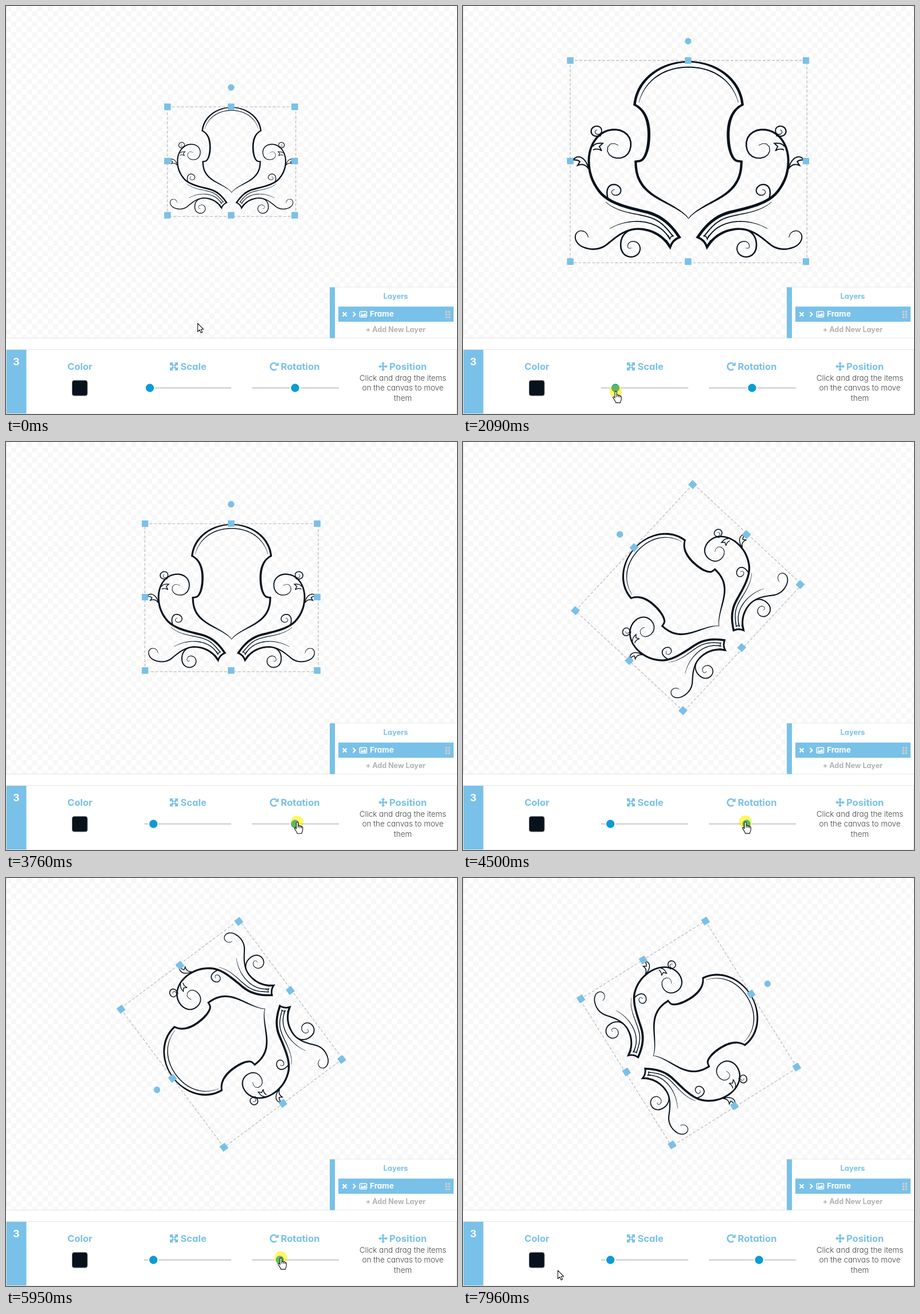
Write an HTML page that moves like this. It is 787 px wide and 712 px high and loops after 7990 ms.

```html
<!DOCTYPE html>
<html lang="en">
<head>
<meta charset="utf-8">
<title>Frame editor</title>
<style>
  html, body { margin: 0; width: 100%; height: 100%; overflow: hidden; background: #fff; }
  svg { display: block; width: 787px; height: 712px; }
  text { font-family: Inter, "Open Sans", sans-serif; font-feature-settings: "cv11"; font-weight: 700; }
  .blue { fill: #79c1e8; }
  .label { font-size: 16.5px; }
  .hint { font-size: 13.4px; font-weight: 300; fill: #444; }
  .mid { text-anchor: middle; }
  .ink { fill: #07121c; }
  .track { stroke: #c9c9c9; stroke-width: 2; }
  .thumb { fill: #0c9bd6; stroke: #fff; stroke-width: 2; }
  .pointer { fill: #fff; stroke: #111; stroke-width: 1.1; stroke-linejoin: round; }
</style>
</head>
<body>
<svg viewBox="0 0 787 712">
  <defs>
    <pattern id="checker" width="18.2" height="18.2" patternUnits="userSpaceOnUse">
      <path d="M0 0h9.1v9.1h-9.1zM9.1 9.1h9.1v9.1h-9.1z" fill="#f7f7f7"/>
    </pattern>
    <path id="diagonal" d="M-7-7H-.9L-2.8-5.1.2-2.1-2.1.2-5.1-2.8-7-.9Z"/>
    <path id="straight" d="M0-8 3.5-4.4H1.3V0H-1.3V-4.4H-3.5Z"/>
  </defs>

  <rect width="787" height="580" fill="url(#checker)"/>
  <path d="M.5 0V579.5H787" fill="none" stroke="#e4e4e4"/>

  <g id="art" class="ink">
    <g id="half"></g>
    <use href="#half" transform="matrix(-1 0 0 1 787.4 0)"/>
  </g>
  <g id="selection">
    <rect id="outline" fill="none" stroke="#c8c8cb" stroke-width="1.6" stroke-dasharray="5 3"/>
    <g id="handles" class="blue" stroke="#6fb4da" stroke-width=".6"></g>
  </g>

  <!-- layers -->
  <rect x="565" y="491" width="222" height="89" fill="#fff"/>
  <path d="M565 490.5H787M565 579.5H787" stroke="#e9e9e9"/>
  <g class="blue">
    <rect x="565" y="491" width="9" height="88.5"/>
    <rect x="580" y="524.5" width="201" height="26.5"/>
    <text class="mid" x="680" y="511.3" font-size="12.8">Layers</text>
  </g>
  <path d="M587.5 534.5l7 7m0-7l-7 7M605.5 534l4 4-4 4" fill="none" stroke="#fff" stroke-width="2.2"/>
  <rect x="617.2" y="533.2" width="12.2" height="9.6" rx="1.2" fill="none" stroke="#fff" stroke-width="1.5"/>
  <path d="M619 541.3v-1.8l2-2 1.6 1.5 3.2-3.2 2 2v3.5z" fill="#fff"/>
  <circle cx="620.4" cy="536" r="1.1" fill="#fff"/>
  <text x="635" y="542.4" font-size="13.5" fill="#fff">Frame</text>
  <path d="M768.3 532v13M773.3 532v13" stroke="#c9ccd0" stroke-width="3.4" stroke-dasharray="3.4 1.4"/>
  <text class="mid" x="680" y="569" font-size="12.5" fill="#b2b2b2">+ Add New Layer</text>

  <!-- controls -->
  <rect x=".5" y="599.5" width="786" height="112" fill="#fff" stroke="#e6e6e6"/>
  <rect class="blue" x="1" y="600" width="34.5" height="111"/>
  <text class="mid" x="18" y="626.5" font-size="17.5" fill="#fff">3</text>
  <g class="blue label">
    <text class="mid" x="129" y="635">Color</text>
    <text x="304.5" y="635">Scale</text>
    <text x="479.5" y="635">Rotation</text>
    <text x="669" y="635">Position</text>
  </g>
  <g class="blue">
    <g id="scaleIcon" transform="translate(293 629)"></g>
    <g id="moveIcon" transform="translate(658 629)"></g>
    <path d="M472 633.4A6.1 6.1 0 1 1 472 624.8" fill="none" stroke="#79c1e8" stroke-width="2.7"/>
    <path d="M475.7 621.3V628H469Z"/>
  </g>
  <g class="mid">
    <text class="hint" x="692.5" y="653.6">Click and drag the items</text>
    <text class="hint" x="692.5" y="671.4">on the canvas to move</text>
    <text class="hint" x="692.5" y="689.2">them</text>
  </g>
  <rect class="ink" x="115.5" y="653.5" width="26.5" height="26.5" rx="3.5" stroke="#666" stroke-width="1"/>
  <path class="track" d="M241 666.5H393M429 666.5H581"/>
  <circle id="scaleThumb" class="thumb" cy="666.5" r="8.2"/>
  <circle id="turnThumb" class="thumb" cy="666.5" r="8.2"/>

  <!-- pointer -->
  <g id="glow">
    <circle r="11" fill="#fff020" fill-opacity=".35"/>
    <circle r="11" fill="#fffc96" style="mix-blend-mode:multiply"/>
  </g>
  <path id="arrow" class="pointer" d="M.5.8V15.4L3.8 12.2 6.2 17.6 8.6 16.5 6.3 11.2H10.6Z"/>
  <path id="hand" class="pointer" d="M-1.4 12V2C-1.4-.2 1.8-.2 1.8 2V7.4C2.2 6 4.5 6.2 4.8 7.8 5.3 6.8 7.2 7 7.5 8.6 8.3 7.8 9.8 8.4 9.8 10V14C9.8 16.6 8 17.4 8 20.4H.2C.2 17.8-3.4 14.6-4.7 11.4-5.2 9.6-3 9.2-1.4 12ZM1.8 7.4V10.4M4.8 7.8V10.8M7.5 8.6V11"/>
</svg>

<script>
const NS = "http://www.w3.org/2000/svg";
const LOOP = 7990;
const $ = id => document.getElementById(id);

function add(parent, tag, attrs) {
  const el = document.createElementNS(NS, tag);
  for (const key in attrs) el.setAttribute(key, attrs[key]);
  return parent.appendChild(el);
}

function place(id, x, y, rest = "") {
  $(id).setAttribute("transform", `translate(${x} ${y}) ${rest}`);
}

// Fills a curve as a pen stroke whose width runs through the given values.
function brush(d, ...widths) {
  const el = add($("half"), "path", { d });
  const length = el.getTotalLength(), steps = 60, left = [], right = [];
  for (let i = 0; i <= steps; i++) {
    const u = i / steps, s = u * length;
    const p = el.getPointAtLength(s);
    const a = el.getPointAtLength(Math.max(0, s - .5));
    const b = el.getPointAtLength(Math.min(length, s + .5));
    const k = Math.min(Math.floor(u * (widths.length - 1)), widths.length - 2);
    const f = u * (widths.length - 1) - k;
    const half = (widths[k] * (1 - f) + widths[k + 1] * f) / 2;
    const n = Math.hypot(b.x - a.x, b.y - a.y) || 1;
    const dx = -(b.y - a.y) / n * half, dy = (b.x - a.x) / n * half;
    left.push(`${(p.x + dx).toFixed(2)} ${(p.y + dy).toFixed(2)}`);
    right.unshift(`${(p.x - dx).toFixed(2)} ${(p.y - dy).toFixed(2)}`);
  }
  el.setAttribute("d", `M${left.join("L")}L${right.join("L")}Z`);
}

function line(d, width) {
  add($("half"), "path", { d, fill: "none", stroke: "#07121c", "stroke-width": width });
}

// shield
brush("M394 97C346 97 303 128 299.5 173", 2.4, 3.6, 4.4, 4.4);
brush("M298 171.5C318 180 324.5 202 324.5 224C324.5 245 320 262 312.5 268.5C309 271 304 271 299.5 271.5", 3.6, 5, 5, 3.6);
brush("M301.5 270C301 300 312 318 338 334C358 346 384 357 393.7 371", 4.2, 4.2, 3, 1);
brush("M307 168C317 130 350 106.5 394 106.5", .6, 2, 2);

// scroll and ribbon
brush("M378 404C362 380 345 366 322 360C290 352 258 346 240 326C225 308 219.5 290 219.5 270C219.5 240 238 215.5 264 215.5C282 215.5 293 227 293 241C293 256 284 265.5 271 265.5C259 265.5 250.5 258 252 249C253 239 263 237 271 243",
  4.6, 5.2, 4.8, 4.4, 3.6, 3, 2.2, .8);
line("M374 399L378 403.5C369 407 364 413 361.5 421L354 409", 3.8);
brush("M361 420C350 402 330 389 304 389C280 390 264 406 250 417C236 427 220 425.5 208 420C194 413 192 398 202 393C210 390.5 217 395 218.5 404",
  4.4, 4, 2.9, 2.8, 2.2, 1);
brush("M249 342C274 364 310 361 334 372C349 379 357 390 367 402", .7, 1.8, 2);
brush("M256 388.5C285 372 318 373 338 384C348 389 355 397 361 406", .7, 1.8, 2);
line("M368 401L363 402.5L361 407L358 400", 1.6);

// curls
brush("M292 391C278 396 274 410 275.5 421C277 434 288 439.5 297 437.5C308 435 312 424 307 416C302 409 292 409 288.5 415C285.5 421 289 425 294 422", 2.6, 2.6, 2, .8);
brush("M254 339C250 328 250 318 257 313C264 309 274 313 275.5 321C276 328 269 332 263 329.5C258 327 258 321 265 320", 2.4, 2.4, 2, .8);
brush("M241 226C228 230 222 223 224 216C226 209 237 207 241 213.5C244 220 239 226 233 223.5C229 221 230 217 234 216", 2, 2.3, 1.9, .8);

// leaves
line("M226 245C231 239 237 239 244 239.5L238 245L242 252.5C236 248.5 232 249 227 251", 1.9);
line("M219 284C216 270 208 261.5 198 263.5L190 269C197 267.5 201 269 204 271.5L200 278C209 274 215 278 219 284", 2);

for (const angle of [0, 90, 180, 270]) {
  add($("scaleIcon"), "use", { href: "#diagonal", transform: `rotate(${angle})` });
  add($("moveIcon"), "use", { href: "#straight", transform: `rotate(${angle})` });
}

const handles = [];
for (const x of [-1, 0, 1])
  for (const y of [-1, 0, 1])
    if (x || y) handles.push({ x, y, el: add($("handles"), "rect", { width: 10.6, height: 10.6 }) });
const knob = add($("handles"), "circle", { cx: -.8, r: 5.3 });

// Smooth monotone curve through [time, value] keys.
function track(keys, t) {
  const last = keys.length - 1;
  if (t <= keys[0][0]) return keys[0][1];
  if (t >= keys[last][0]) return keys[last][1];
  const i = keys.findIndex(key => key[0] > t) - 1;
  const rise = j => (keys[j + 1][1] - keys[j][1]) / (keys[j + 1][0] - keys[j][0]);
  const slope = j => {
    if (j === 0 || j === last) return 0;
    const a = rise(j - 1), b = rise(j);
    return a * b > 0 ? 2 * a * b / (a + b) : 0;
  };
  const [t0, v0] = keys[i], [t1, v1] = keys[i + 1];
  const span = t1 - t0, u = (t - t0) / span, w = 1 - u;
  return v0 * w * w * (1 + 2 * u) + v1 * u * u * (3 - 2 * u)
    + span * u * w * (slope(i) * w - slope(i + 1) * u);
}

const widthKeys = [[990, 224], [1780, 500], [1890, 500], [2090, 413.5], [2660, 302.5]];
const angleKeys = [[3880, 0], [4500, -47], [5540, -160], [5770, -160], [5950, -126.9], [6840, 37.1], [7070, 58]];
const pointerX = [[140, 334], [970, 254], [1780, 273], [1890, 273], [2090, 266.5], [2660, 258], [2800, 258],
  [3080, 370], [3330, 545], [3530, 508], [3880, 508], [4500, 492.5], [5540, 473], [5770, 473],
  [5950, 479.5], [6840, 513], [7070, 517], [7440, 517], [7700, 340], [7960, 165]];
const pointerY = [[140, 553], [970, 662], [1780, 672], [2800, 672], [3080, 694], [3530, 663],
  [5950, 662.5], [6840, 664.5], [7440, 664], [7700, 690], [7960, 684]];

const within = (t, ...ranges) => ranges.some(([from, to]) => t >= from && t < to);
const show = (id, on) => $(id).style.display = on ? "" : "none";

function draw(now) {
  const t = now % LOOP;
  const w = track(widthKeys, t), h = w * .854, angle = track(angleKeys, t);

  place("art", 393.6, 271.6, `rotate(${angle}) scale(${w / 413.5}) translate(-393.7 -271.5)`);
  place("selection", 393.6, 271.6, `rotate(${angle})`);
  const box = { x: -w / 2, y: -h / 2, width: w, height: h };
  for (const key in box) $("outline").setAttribute(key, box[key]);
  for (const { x, y, el } of handles) {
    el.setAttribute("x", x * (w / 2 - 1) - 6.1);
    el.setAttribute("y", y * (h / 2 - 1) - 6.3);
  }
  knob.setAttribute("cy", -h / 2 - 33.8);

  $("scaleThumb").setAttribute("cx", 251 + (w - 224) / 12.63);
  $("turnThumb").setAttribute("cx", 504.5 + angle / 4.77);

  const x = track(pointerX, t), y = track(pointerY, t);
  const overThumb = within(t, [930, 2890], [3480, 7520]);
  for (const id of ["glow", "arrow", "hand"]) place(id, x, y);
  show("glow", within(t, [1010, 2840], [3760, 7480]));
  show("hand", overThumb);
  show("arrow", !overThumb);
}

const start = performance.now();
function tick() {
  draw(performance.now() - start);
  requestAnimationFrame(tick);
}
tick();
</script>
</body>
</html>
```
